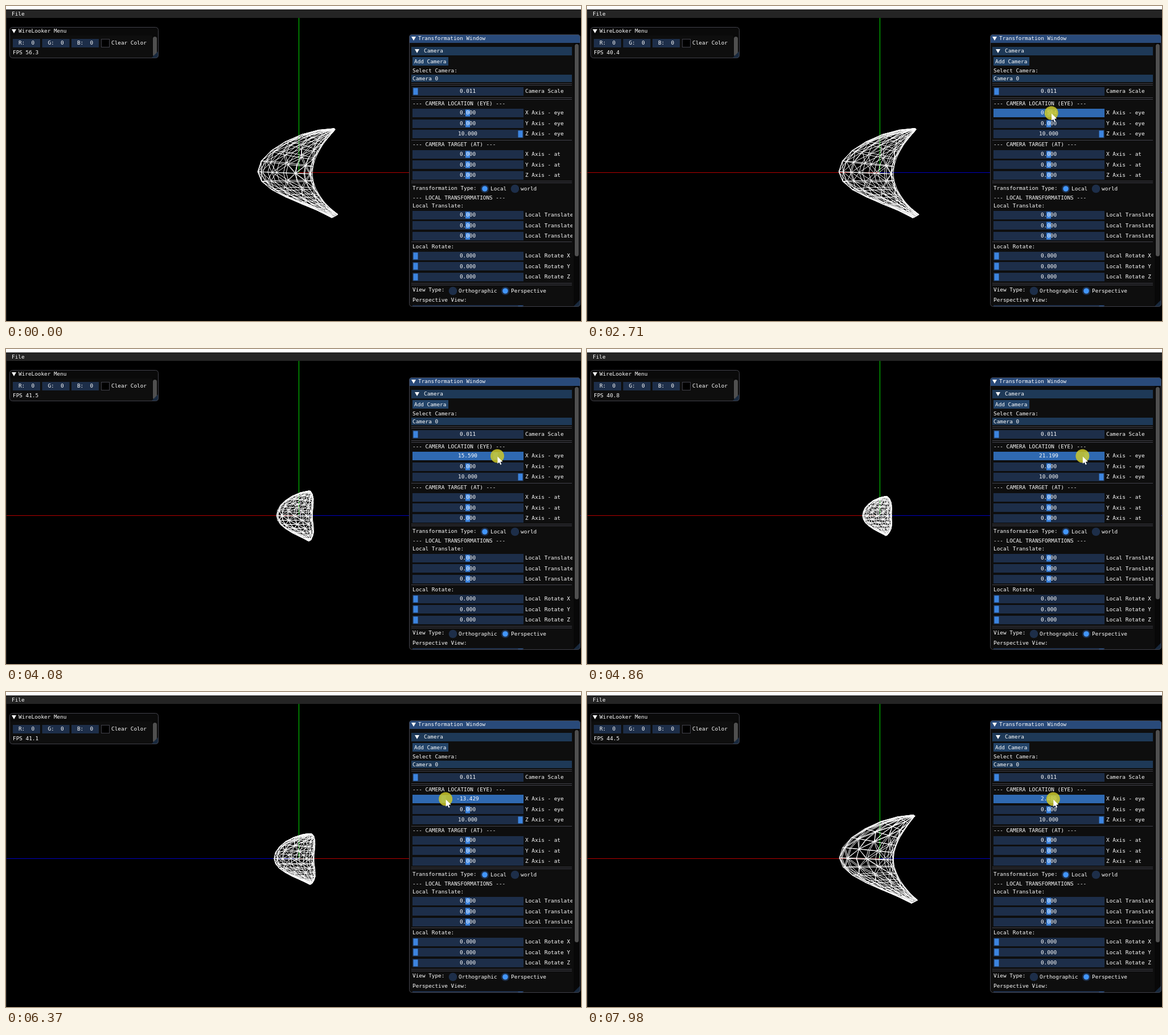
An HTML page with a canvas for the animation above (8000 ms loop, 1010 by 555 pixels).

```html
<!DOCTYPE html>
<html lang="en">
<head>
<meta charset="utf-8">
<title>Mesh camera panel</title>
<style>
html, body { margin: 0; width: 100%; height: 100%; overflow: hidden; background: #000; }
canvas { display: block; }
</style>
</head>
<body>
<canvas id="stage" width="1010" height="555"></canvas>
<script>
const ctx = document.getElementById('stage').getContext('2d');
const LOOP = 8000, STEP = 70;
const DRAG_START = 1740;
const CURSOR_LEAD = 80;
const CENTER = { x: 514, y: 294 };
const FOCAL = 645;
const SEGMENTS = 16, HALF_RINGS = 6;
const LEFT = 719.5, MID = 811, RIGHT = 903.5;
const PX_PER_UNIT = 3.14;

const COLOR = {
  panel: '#0e0e0e', border: '#41414a', frame: '#1d2e49', hover: '#224569', active: '#2f69b1',
  header: '#1e3957', button: '#234469', title: '#294a7a', grab: '#3d85e0', check: '#4296fa',
  scroll: '#4f4f4f', grip: '#18293e'
};

// Monotone cubic curve through [time, value] points
function curve(points) {
  const secant = i => (points[i + 1][1] - points[i][1]) / (points[i + 1][0] - points[i][0]);
  const last = points.length - 1;
  const slopes = points.map((_, i) => {
    if (i === 0) return secant(0);
    if (i === last) return secant(last - 1);
    const a = secant(i - 1), b = secant(i);
    return a * b > 0 ? 2 * a * b / (a + b) : 0;
  });
  return t => {
    if (t <= points[0][0]) return points[0][1];
    if (t >= points[last][0]) return points[last][1];
    const i = points.findIndex(p => p[0] > t) - 1;
    const [t0, v0] = points[i], [t1, v1] = points[i + 1];
    const span = t1 - t0, p = (t - t0) / span, q = 1 - p;
    return v0 + (v1 - v0) * p * p * (3 - 2 * p) + span * p * q * (slopes[i] * q - slopes[i + 1] * p);
  };
}

const eyeAt = curve([
  [DRAG_START, 0], [2150, -3], [3220, 7.205], [4060, 15.59], [4700, 22.8],
  [5460, -3.275], [6130, -15], [7070, -3.013], [7980, 2.489]
]);
const fpsAt = curve([[0, 56.3], [1820, 44.5], [3220, 39.2], [4060, 41.5], [5460, 40.2], [7980, 44.5]]);

function bezier(a, b, c, d) {
  return t => [0, 1].map(k => {
    const q = 1 - t;
    return a[k] * q ** 3 + 3 * b[k] * q * q * t + 3 * c[k] * q * t * t + d[k] * t ** 3;
  });
}

// Crescent tube: rings span an outer and an inner outline, thickest in the middle
function buildMesh() {
  const outerTop = bezier([62, 78], [10, 78], [-72, 40], [-72, 2]);
  const outerLow = bezier([-72, 2], [-70, -35], [10, -50], [58, -79]);
  const innerTop = bezier([64, 76], [40, 50], [24, 25], [24, -2]);
  const innerLow = bezier([24, -2], [24, -25], [42, -55], [69, -73]);
  const rings = [];
  for (let i = -HALF_RINGS; i <= HALF_RINGS; i++) {
    const v = i / HALF_RINGS;
    const [ox, oy] = v < 0 ? outerTop(1 + v) : outerLow(v);
    const [ix, iy] = v < 0 ? innerTop(1 + v) : innerLow(v);
    const depth = 4 + 59 * (1 - Math.abs(v) ** 2.3);
    rings.push(Array.from({ length: SEGMENTS }, (_, j) => {
      const a = j / SEGMENTS * Math.PI * 2, c = Math.cos(a);
      return [(ox + ix - (ix - ox) * c) / 2, (oy + iy - (iy - oy) * c) / 2, depth * Math.sin(a)];
    }));
  }
  return rings;
}
const MESH = buildMesh();

function rect(x, y, w, h, color) {
  ctx.fillStyle = color;
  ctx.fillRect(x, y, w, h);
}

function text(str, x, y, align = 'left') {
  ctx.fillStyle = '#fff';
  ctx.textAlign = align;
  ctx.fillText(str, x, y + 0.7);
}

function polygon(color, points) {
  ctx.fillStyle = color;
  ctx.beginPath();
  points.forEach(([x, y]) => ctx.lineTo(x, y));
  ctx.fill();
}

function disc(x, y, r, color) {
  ctx.fillStyle = color;
  ctx.beginPath();
  ctx.arc(x, y, r, 0, Math.PI * 2);
  ctx.fill();
}

const arrowDown = (x, y) => polygon('#fff', [[x - 4, y - 3], [x + 4, y - 3], [x, y + 4]]);

function panel(x, y, w, h, titleColor, title, body) {
  ctx.save();
  ctx.beginPath();
  ctx.roundRect(x, y, w, h, 5);
  ctx.clip();
  rect(x, y, w, h, COLOR.panel);
  rect(x, y, w, 15, titleColor);
  arrowDown(x + 8, y + 7);
  text(title, x + 16, y + 7);
  body();
  polygon(COLOR.grip, [[x + w, y + h - 13], [x + w, y + h], [x + w - 13, y + h]]);
  ctx.restore();
  ctx.strokeStyle = COLOR.border;
  ctx.lineWidth = 1;
  ctx.beginPath();
  ctx.roundRect(x + 0.5, y + 0.5, w - 1, h - 1, 5);
  ctx.stroke();
}

function scrollGrab(x, y, h) {
  ctx.fillStyle = COLOR.scroll;
  ctx.beginPath();
  ctx.roundRect(x, y, 7, h, 4);
  ctx.fill();
}

function slider(y, value, label, grabX, style = {}) {
  const top = Math.round(y - 7.5);
  rect(714, top, 195, 15, style.frame || COLOR.frame);
  rect(grabX - 4, top + 1.5, 8, 12, style.grab || COLOR.grab);
  text(value.toFixed(3), MID, y, 'center');
  text(label, 912, y);
}

// Three X/Y/Z sliders below each other
function axisSliders(y, prefix, suffix, grabX) {
  ['X', 'Y', 'Z'].forEach((axis, i) => slider(y + i * 18.5, 0, prefix + axis + suffix, grabX));
}

function radio(x, y, label, on) {
  disc(x, y, 7.3, COLOR.frame);
  if (on) disc(x, y, 4.8, COLOR.check);
  text(label, x + 10, y);
}

function separator(...rows) {
  rows.forEach(y => rect(712, y, 282, 1, COLOR.border));
}

function menuPanel(fps) {
  panel(6, 37, 262, 55, '#0a0a0a', 'WireLooker Menu', () => {
    ['R', 'G', 'B'].forEach((name, i) => {
      const x = 12 + i * 51.5;
      rect(x, 58, 48, 15, COLOR.frame);
      text(name + ':  0', x + 24, 65, 'center');
    });
    rect(167, 58, 15, 15, COLOR.border);
    rect(168, 59, 13, 13, '#000');
    text('Clear Color', 185, 65);
    text('FPS ' + fps.toFixed(1), 12, 81.5);
    rect(257, 52, 10, 40, '#080808');
    scrollGrab(258, 54, 35);
  });
}

function transformPanel(eye, cursor, dragging) {
  const hover = y => !dragging && cursor && Math.abs(cursor.y - y) < 8 && cursor.x < 909
    ? { frame: COLOR.hover } : {};
  const eyeStyle = dragging ? { frame: COLOR.active, grab: COLOR.check } : hover(188);

  panel(708, 50, 301, 480, COLOR.title, 'Transformation Window', () => {
    rect(997, 65, 11, 465, '#080808');
    scrollGrab(999, 67, 374);
    ctx.save();
    ctx.beginPath();
    ctx.rect(709, 65, 286, 464);
    ctx.clip();

    rect(712, 72, 282, 15, COLOR.header);
    arrowDown(722, 79);
    text('Camera', 734, 79);
    rect(714, 90, 63, 15, COLOR.button);
    text('Add Camera', 717, 97.5);
    text('Select Camera:', 714, 114);
    rect(712, 121, 282, 13, COLOR.header);
    text('Camera 0', 714, 127.5);
    separator(136, 139);
    slider(150, 0.011, 'Camera Scale', LEFT);
    separator(161, 164);

    text('--- CAMERA LOCATION (EYE) ---', 714, 172);
    slider(188, eye, 'X Axis - eye', MID + eye * PX_PER_UNIT, eyeStyle);
    slider(207, 0, 'Y Axis - eye', MID, hover(207));
    slider(225, 10, 'Z Axis - eye', RIGHT);
    separator(236);
    text('--- CAMERA TARGET (AT) ---', 714, 244);
    axisSliders(261, '', ' Axis - at', MID);
    separator(308, 311);

    text('Transformation Type:', 714, 320.5);
    radio(841, 322, 'Local', true);
    radio(894, 322, 'world', false);
    text('--- LOCAL TRANSFORMATIONS ---', 714, 338);
    text('Local Translate:', 714, 352);
    axisSliders(368, 'Local Translate ', '', MID);
    separator(415);
    text('Local Rotate:', 714, 424);
    axisSliders(440, 'Local Rotate ', '', LEFT);
    separator(488, 491);

    text('View Type:', 714, 500);
    radio(785, 502, 'Orthographic', false);
    radio(877, 502, 'Perspective', true);
    text('Perspective View:', 714, 518);
    slider(534, 0, '', RIGHT);
    ctx.restore();
  });
}

function drawAxes(eye) {
  const { x, y } = CENTER, row = y - 1;
  rect(x, 21, 1, y - 21, '#00dc00');
  // The axis running behind the camera flips to the opposite side.
  const red = '#b40000', blue = '#0000c0';
  if (eye > 0) {
    rect(1, row, x, 1, red);
    rect(x, row, 496, 1, blue);
  } else {
    rect(x, row, 496, 1, red);
    if (eye < 0) rect(1, row, x, 1, blue);
  }
}

function drawMesh(eye) {
  const dist = Math.hypot(eye, 10), c = 10 / dist, s = eye / dist;
  const pts = MESH.map(ring => ring.map(([x, y, z]) => {
    const k = FOCAL / (FOCAL * dist / 10 - (x * s + z * c));
    return [CENTER.x + (x * c - z * s) * k, CENTER.y - y * k];
  }));
  const edge = (a, b) => { ctx.moveTo(...a); ctx.lineTo(...b); };
  ctx.strokeStyle = '#fff';
  ctx.lineWidth = 1;
  ctx.beginPath();
  pts.forEach((ring, i) => ring.forEach((p, j) => {
    const n = (j + 1) % SEGMENTS, below = pts[i + 1];
    edge(p, ring[n]);
    if (!below) return;
    edge(p, below[j]);
    if ((i + j) % 2) edge(p, below[n]);
    else edge(ring[n], below[j]);
  }));
  ctx.stroke();
}

function cursorAt(t) {
  if (t < STEP) return null;
  if (t >= DRAG_START) return { x: MID + eyeAt(t + CURSOR_LEAD) * PX_PER_UNIT, y: 189 };
  const rest = 1 - (t - STEP) / (DRAG_START - STEP);
  return { x: MID + 165 * rest ** 2.3, y: 189 + 369 * rest ** 4.7 };
}

function drawCursor({ x, y }) {
  disc(x, y - 0.5, 12, 'rgba(205,200,40,0.84)');
  const shape = [[0, 0], [0, 12.5], [2.9, 10], [5, 14.5], [6.9, 13.6], [4.9, 9.3], [9, 9]];
  polygon('#fff', shape.map(([dx, dy]) => [x + 0.5 + dx, y + 0.5 + dy]));
}

function draw(now) {
  const t = Math.floor((now % LOOP + 10) / STEP) * STEP;
  const eye = eyeAt(t), cursor = cursorAt(t);
  ctx.font = '9.36px "DejaVu Sans Mono", monospace';
  ctx.textBaseline = 'middle';
  rect(0, 0, 1010, 555, '#000');
  rect(0, 0, 1010, 6, '#fff');
  rect(0, 6, 1010, 15, '#242424');
  rect(0, 6, 1, 549, '#2c2c2c');
  text('File', 10, 13.5);
  drawAxes(eye);
  drawMesh(eye);
  menuPanel(fpsAt(t));
  transformPanel(eye, cursor, t >= DRAG_START);
  if (cursor) drawCursor(cursor);
}

const started = performance.now();
function tick() {
  draw(performance.now() - started);
  requestAnimationFrame(tick);
}
tick();
</script>
</body>
</html>
```
